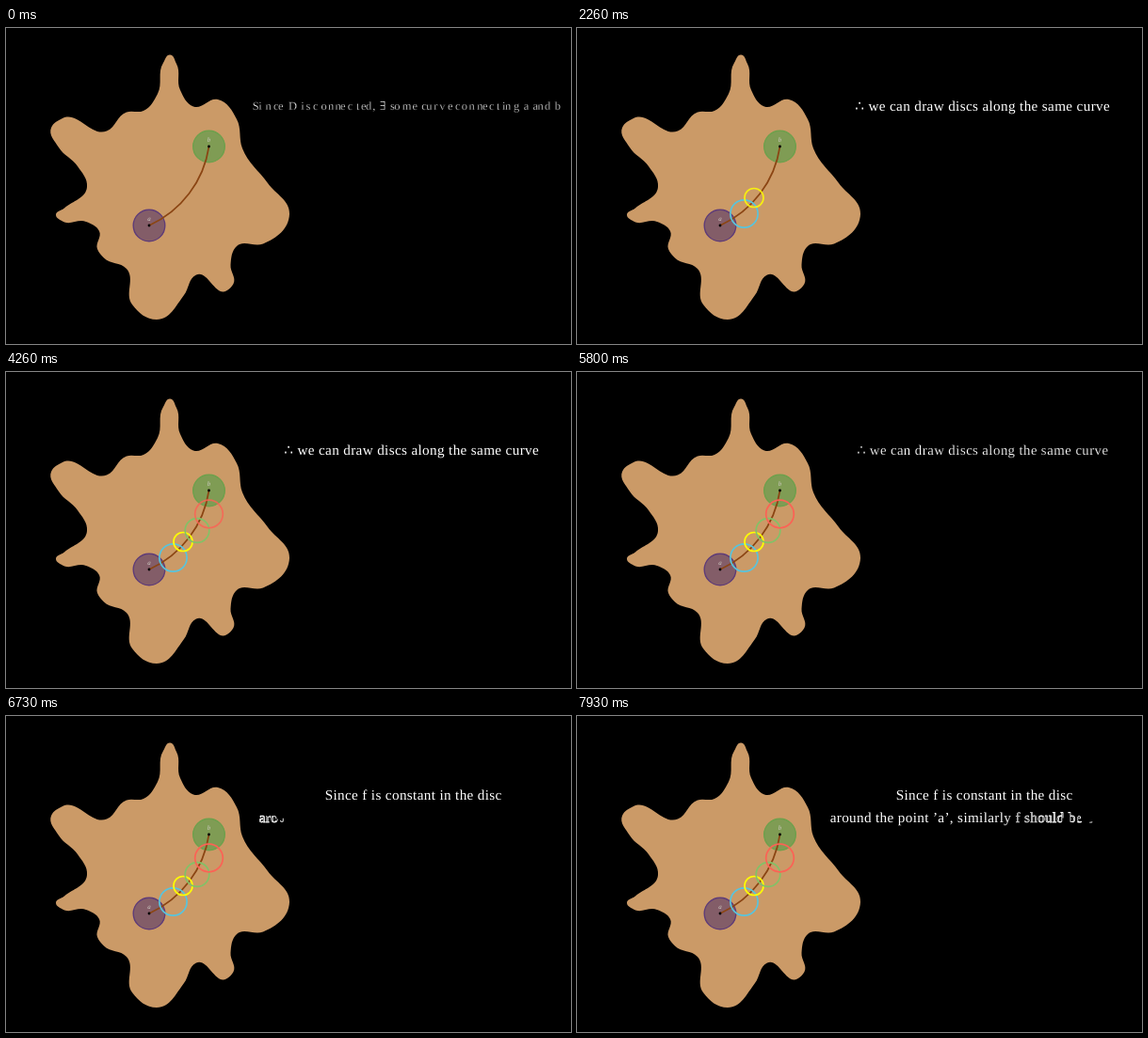
An HTML page with a canvas that plays this animation: 600x336 px, repeating every 8000 ms.

```html
<!DOCTYPE html>
<html lang="en">
<head>
<meta charset="utf-8">
<title>Discs along a curve</title>
<style>
html, body { margin: 0; width: 100%; height: 100%; overflow: hidden; background: #000; }
canvas { display: block; width: 600px; height: 336px; }
</style>
</head>
<body>
<canvas id="stage"></canvas>
<script>
const LOOP = 8000;
const STEP = 1005;          // length of one fade or text change
const FIRST_RING = 590;     // the rings follow one another from here
const CHANGE = FIRST_RING + 5 * STEP - 10;
const WRITE = CHANGE + STEP - 20;

const SIZE = 15.2;
const TRACKING = 0.35;
const FONT = `${SIZE}px "Liberation Serif", "DejaVu Serif", serif`;

const canvas = document.getElementById('stage');
const ratio = window.devicePixelRatio || 1;
canvas.width = 600 * ratio;
canvas.height = 336 * ratio;
const ctx = canvas.getContext('2d');
ctx.scale(ratio, ratio);
ctx.lineJoin = 'round';
ctx.textRendering = 'geometricPrecision';

const clamp = v => Math.min(1, Math.max(0, v));
const lerp = (a, b, p) => a + (b - a) * p;
const sigmoid = v => 1 / (1 + Math.exp(-v));
const smooth = v => {
  const edge = sigmoid(-5);
  return clamp((sigmoid(10 * (clamp(v) - 0.5)) - edge) / (1 - 2 * edge));
};

// Key points of the region: tips, valleys and the bends between them.
const bends = [
  [174, 28.5], [181, 38], [185, 66], [199, 83.5], [225, 76], [245, 97],
  [251, 128], [278, 165], [301, 198], [273, 229.5], [245, 232], [238.5, 252],
  [241.5, 272], [234, 279.5], [202, 262.5], [189, 284], [160, 310], [134, 294],
  [128, 256], [104, 244.5], [97, 235], [99, 216], [85, 206], [60, 205.5],
  [53, 199], [62, 191.5], [86, 169], [76, 147], [56, 127], [48, 106],
  [60, 96], [107, 109.5], [128, 89.5], [146, 88], [161, 70], [167, 37]
];

// Joins points smoothly; each heading follows the circle through its neighbours.
function closedCurve(points) {
  const n = points.length;
  const heading = points.map((p, i) => {
    const before = points[(i + n - 1) % n], after = points[(i + 1) % n];
    const near = Math.hypot(p[0] - before[0], p[1] - before[1]) ** 2;
    const far = Math.hypot(after[0] - p[0], after[1] - p[1]) ** 2;
    return Math.atan2((p[1] - before[1]) / near + (after[1] - p[1]) / far,
                      (p[0] - before[0]) / near + (after[0] - p[0]) / far);
  });
  const path = new Path2D();
  path.moveTo(...points[0]);
  points.forEach((a, i) => {
    const j = (i + 1) % n, b = points[j];
    const reach = 0.37 * Math.hypot(b[0] - a[0], b[1] - a[1]);
    path.bezierCurveTo(
      a[0] + reach * Math.cos(heading[i]), a[1] + reach * Math.sin(heading[i]),
      b[0] - reach * Math.cos(heading[j]), b[1] - reach * Math.sin(heading[j]),
      ...b);
  });
  return path;
}

const region = closedCurve(bends);
const link = new Path2D('M152 210A110 110 0 0 0 215.5 126');

const ends = [
  { x: 152, y: 210, fill: '#835d68', line: '#5f3c78', label: 'a' },
  { x: 215.5, y: 126, fill: '#7f9c54', line: '#6ea04c', label: 'b' }
];

const rings = [
  { x: 177.5, y: 197.5, r: 14.6, color: '#58c4dd' },
  { x: 188, y: 180.5, r: 10, color: '#ffff00' },
  { x: 203, y: 168.5, r: 12.8, color: '#83c167' },
  { x: 215.5, y: 151, r: 14.8, color: '#fc6255' }
];

// Lays out the visible glyphs of a centred line.
function layout(text, center, y) {
  ctx.font = FONT;
  let pen = 0;
  const glyphs = [];
  for (const char of text) {
    const width = ctx.measureText(char).width;
    if (char !== ' ') glyphs.push({ char, x: pen + width / 2, y });
    pen += width + TRACKING;
  }
  glyphs.forEach(g => { g.x += center - (pen - TRACKING) / 2; });
  return glyphs;
}

function startAt(glyphs, left) {
  const shift = left - glyphs[0].x;
  glyphs.forEach(g => { g.x += shift; });
  return glyphs;
}

const premise = layout('Since D is connected, ∃ some curve connecting a and b', 423, 87.5);
const claim = layout('∴ we can draw discs along the same curve', 430.5, 88);
const reason = layout('Since f is constant in the disc', 432.5, 89);
const reasonEnd = startAt(
  layout('around the point ’a’, similarly f should be constant', 432.5, 112.5), 272);

function disc(x, y, r) {
  ctx.beginPath();
  ctx.arc(x, y, r, 0, Math.PI * 2);
}

function ring(x, y, r, color, width) {
  disc(x, y, r);
  ctx.strokeStyle = color;
  ctx.lineWidth = width;
  ctx.stroke();
}

function drawLine(glyphs) {
  ctx.fillStyle = '#fff';
  glyphs.forEach(g => ctx.fillText(g.char, g.x, g.y));
}

// Each glyph slides to its partner, shrinking and thinning on the way.
function morph(from, to, p) {
  const count = Math.max(from.length, to.length);
  const away = Math.min(p, 1 - p);
  const scale = 1 - 0.6 * away;
  const middle = SIZE * 0.22;
  ctx.fillStyle = '#fff';
  ctx.strokeStyle = '#000';
  ctx.lineWidth = 0.5 * Math.sqrt(2 * away) + 0.001;
  for (let i = 0; i < count; i++) {
    const a = from[Math.floor(i * from.length / count)];
    const b = to[Math.floor(i * to.length / count)];
    const char = p < 0.5 ? a.char : b.char;
    ctx.save();
    ctx.translate(lerp(a.x, b.x, p), lerp(a.y, b.y, p) - middle);
    ctx.scale(scale, scale);
    ctx.fillText(char, 0, middle);
    ctx.strokeText(char, 0, middle);
    ctx.restore();
  }
}

// Traces each glyph's outline, then fills it, one glyph after another.
function write(glyphs, progress) {
  const lag = 4 / (glyphs.length + 1);
  const head = progress * ((glyphs.length - 1) * lag + 1);
  ctx.strokeStyle = '#fff';
  ctx.fillStyle = '#fff';
  glyphs.forEach((g, i) => {
    const p = clamp(head - i * lag);
    if (p <= 0) return;
    const filled = clamp(2 * p - 1);
    if (p < 0.5) ctx.setLineDash([SIZE * 6 * p, SIZE * 10]);
    ctx.lineWidth = 0.85 * (1 - filled);
    if (filled < 1) ctx.strokeText(g.char, g.x, g.y);
    ctx.setLineDash([]);
    ctx.globalAlpha = filled;
    ctx.fillText(g.char, g.x, g.y);
    ctx.globalAlpha = 1;
  });
}

function drawScene(t) {
  ctx.fillStyle = '#000';
  ctx.fillRect(0, 0, 600, 336);
  ctx.fillStyle = '#cb9a67';
  ctx.fill(region);

  ends.forEach(e => {
    disc(e.x, e.y, 17);
    ctx.fillStyle = e.fill;
    ctx.fill();
    ring(e.x, e.y, 16.8, e.line, 1.4);
  });

  ctx.strokeStyle = '#8b4513';
  ctx.lineWidth = 1.7;
  ctx.stroke(link);

  ctx.font = 'italic 7px "Liberation Serif", serif';
  ends.forEach(e => {
    disc(e.x, e.y, 1.4);
    ctx.fillStyle = '#000';
    ctx.fill();
    ctx.fillStyle = '#d0ccc4';
    ctx.fillText(e.label, e.x, e.y - 5.5);
  });

  rings.forEach((c, i) => {
    ctx.globalAlpha = smooth((t - FIRST_RING - i * STEP) / STEP);
    ring(c.x, c.y, c.r, c.color, 1.7);
  });
  ctx.globalAlpha = 1;
}

function drawText(t) {
  ctx.font = FONT;
  if (t < FIRST_RING) morph(premise, claim, smooth((t - FIRST_RING) / STEP + 1));
  else if (t < CHANGE) drawLine(claim);
  else if (t < WRITE) morph(claim, reason, smooth((t - CHANGE) / (WRITE - CHANGE)));
  else {
    drawLine(reason);
    write(reasonEnd, (t - WRITE) / 2000);
  }
}

function frame() {
  const t = performance.now() % LOOP;
  drawScene(t);
  drawText(t);
  requestAnimationFrame(frame);
}

ctx.textAlign = 'center';
frame();
</script>
</body>
</html>
```
